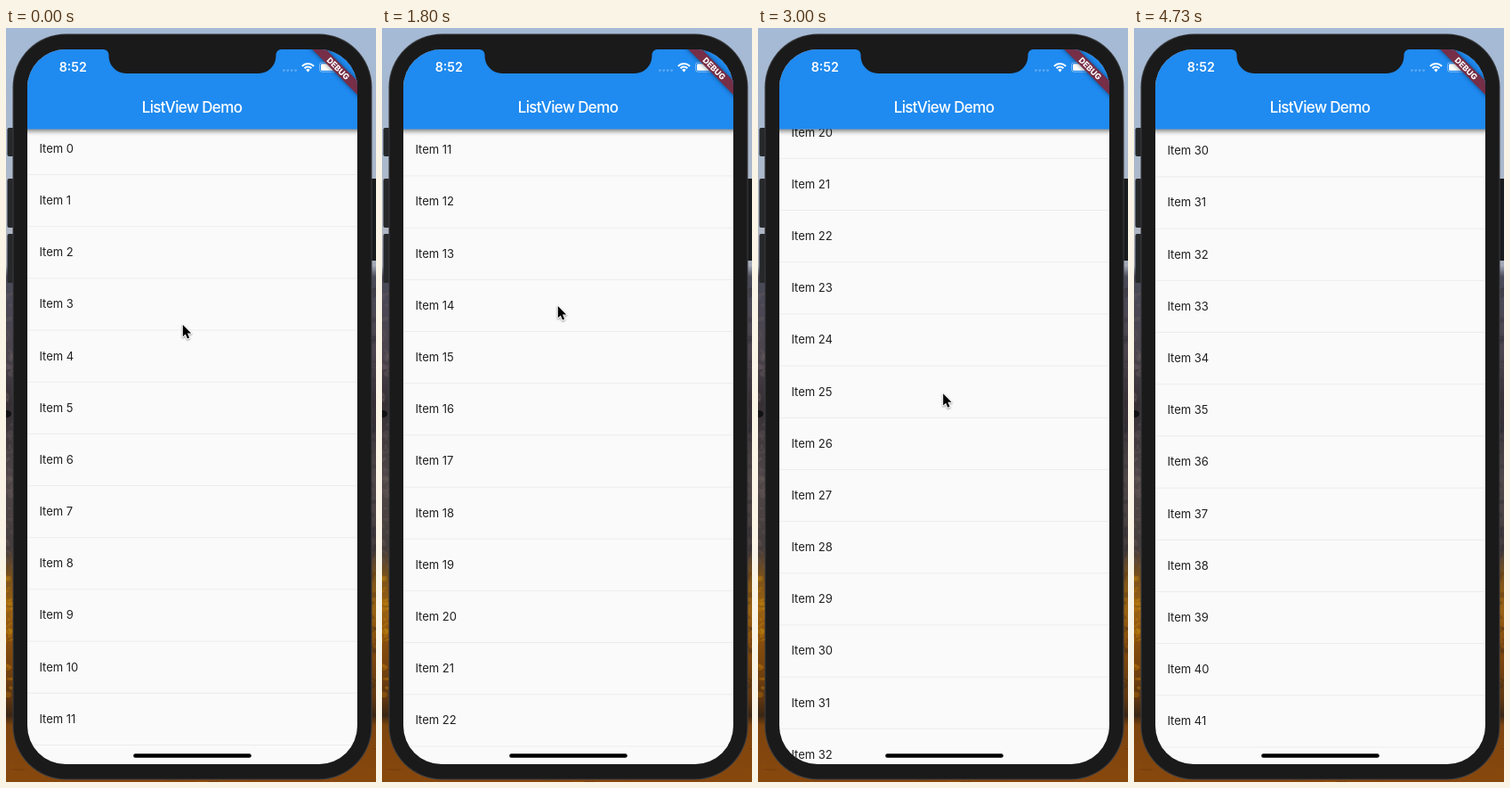
Animation, 416 px wide and 846 px high, one loop 4790 ms. Source, as an HTML page with a canvas:

```html
<!DOCTYPE html>
<html lang="en">
<head>
<meta charset="utf-8">
<title>ListView Demo</title>
<style>
  html, body { margin: 0; width: 100%; height: 100%; overflow: hidden; }
  canvas { display: block; width: 416px; height: 846px; }
</style>
</head>
<body>
<canvas id="stage" width="416" height="846"></canvas>
<script>
const W = 416, H = 846, LOOP = 4790, FPS = 15;
const PITCH = 58.18, FIRST_BASELINE = 139.8, FIRST_DIVIDER = 164;
const SCREEN = { x: 24, y: 24, w: 371, h: 802, r: 43 };
const BAR_BOTTOM = 113.5, BLUE = '#1f8af0';
const FONT = 'Inter, "Liberation Sans", sans-serif';

const scrollKeys = [
  [0, 0], [8, 30], [14, 105], [18, 265.4], [22, 470], [27, 638.5],
  [30, 710], [33, 870], [39, 1082.4], [43, 1165], [48, 1201],
  [52, 1232], [55, 1349.7], [58, 1525], [63, 1693.7], [71, 1742.9]
];
const pointerKeys = [
  [0, 198, 332], [8, 200, 302], [14, 206, 232], [18, 216, 134],
  [22, 207, 220], [27, 197, 311], [29, 200, 290], [32, 214, 150],
  [39, 205, 410], [51, 214, 407], [55, 257, 274.5], [58, 290, 180],
  [62, 440, 120]
];

// Monotone cubic interpolation of one column of a key list
function curve(keys, column) {
  const n = keys.length;
  const slope = i => (keys[i + 1][column] - keys[i][column]) / (keys[i + 1][0] - keys[i][0]);
  const tangent = i => {
    if (i === 0 || i === n - 1) return 0;
    const a = slope(i - 1), b = slope(i);
    return a * b <= 0 ? 0 : 2 * a * b / (a + b);
  };
  return t => {
    if (t >= keys[n - 1][0]) return keys[n - 1][column];
    let i = 0;
    while (t >= keys[i + 1][0]) i++;
    const span = keys[i + 1][0] - keys[i][0], u = (t - keys[i][0]) / span;
    const v = 1 - u;
    return keys[i][column] * v * v * (1 + 2 * u) + keys[i + 1][column] * u * u * (3 - 2 * u)
      + span * u * v * (v * tangent(i) - u * tangent(i + 1));
  };
}
const scrollAt = curve(scrollKeys, 1);
const pointerX = curve(pointerKeys, 1), pointerY = curve(pointerKeys, 2);

const g = document.getElementById('stage').getContext('2d');

function layer(paint) {
  const canvas = document.createElement('canvas');
  canvas.width = W;
  canvas.height = H;
  paint(canvas.getContext('2d'));
  return canvas;
}

function roundRect(c, x, y, w, h, r, fill) {
  c.beginPath();
  c.roundRect(x, y, w, h, r);
  c.fillStyle = fill;
  c.fill();
}

function text(c, string, x, y, font, fill, align = 'left', spacing = 0) {
  c.font = `${font} ${FONT}`;
  c.fillStyle = fill;
  c.textAlign = align;
  c.letterSpacing = `${spacing}px`;
  c.fillText(string, x, y);
}

function seeded(seed) {
  return () => (seed = seed * 16807 % 2147483647) / 2147483647;
}

function paintWallpaper(c) {
  const tones = c.createLinearGradient(0, 0, 0, H);
  [[0, '#a5bad6'], [0.14, '#a9b9cf'], [0.26, '#b0b8c6'], [0.315, '#a3a9b6'],
   [0.33, '#4a4a58'], [0.43, '#4b444d'], [0.5, '#352f34'], [0.6, '#504749'],
   [0.69, '#453c3c'], [0.73, '#7d5218'], [0.77, '#9a6212'], [0.83, '#80480c'],
   [0.89, '#5e3610'], [0.912, '#3a2615'], [0.925, '#7e440e'], [1, '#87480d']
  ].forEach(([at, tone]) => tones.addColorStop(at, tone));
  c.fillStyle = tones;
  c.fillRect(0, 0, W, H);

  const random = seeded(41);
  const speckle = (count, top, bottom, colors) => {
    for (let i = 0; i < count; i++) {
      c.fillStyle = colors[i % colors.length];
      const x = (i % 2 ? 400 : 0) + random() * 16, y = top + random() * (bottom - top);
      c.beginPath();
      c.ellipse(x, y, 1 + random() * 3, 1 + random() * 4, random() * 3, 0, 7);
      c.fill();
    }
  };
  speckle(150, 290, 605, ['#6b5f6344', '#2a273055', '#7d706b33', '#332c3355']);
  speckle(90, 612, 750, ['#c8800a55', '#5a361266', '#d0940f55', '#3c281655']);
  for (let i = 0; i < 60; i++) {
    c.fillStyle = i % 2 ? '#a8600d44' : '#4c290c55';
    c.fillRect(random() * W, 778 + random() * 68, 3 + random() * 12, 1);
  }
}

function paintPhone(c) {
  c.fillStyle = '#111';
  c.beginPath();
  c.ellipse(1, 433, 5, 4, 0, 0, 7);
  c.fill();
  [[112, 32], [169, 55], [231, 55]].forEach(([y, h]) => roundRect(c, 1.5, y, 10, h, 2, '#27282a'));
  roundRect(c, 408, 169, 10, 92, 2, '#191a1b');
  roundRect(c, 7.5, 6.5, 404, 837, 60, '#3c3d40');
  roundRect(c, 8.5, 7.5, 402, 835, 59, '#1a1a1b');
}

function paintStatus(c) {
  text(c, '8:52', 75.2, 49.4, '600 14.2px', '#fff', 'center');
  for (let i = 0; i < 4; i++) roundRect(c, 311 + i * 4.4, 46.2, 2.8, 2.8, 1.4, '#ffffff44');

  c.strokeStyle = '#fff';
  c.lineWidth = 2;
  [5.4, 9].forEach(r => {
    c.beginPath();
    c.arc(339.5, 49, r, -Math.PI * 0.76, -Math.PI * 0.24);
    c.stroke();
  });
  c.beginPath();
  c.moveTo(339.5, 49.5);
  c.arc(339.5, 49, 3, -Math.PI * 0.76, -Math.PI * 0.24);
  c.fillStyle = '#fff';
  c.fill();

  c.lineWidth = 0.8;
  c.strokeStyle = '#ffffff88';
  c.beginPath();
  c.roundRect(352.5, 38.8, 21, 10.4, 2.8);
  c.stroke();
  roundRect(c, 354, 40.2, 18, 7.6, 1.6, '#fff');
}

function paintRibbon(c) {
  c.save();
  c.translate(SCREEN.x + SCREEN.w, SCREEN.y);
  c.rotate(Math.PI / 4);
  c.shadowColor = '#0008';
  c.shadowBlur = 5;
  c.fillStyle = '#772e47';
  c.fillRect(-45, 25, 90, 10.8);
  c.shadowColor = 'transparent';
  text(c, 'DEBUG', 0, 33.7, '800 9px', '#fff', 'center');
  c.restore();
}

function paintNotch(c) {
  c.beginPath();
  c.moveTo(108, 23);
  c.lineTo(109, 24);
  c.arcTo(115.5, 24, 115.5, 30, 6);
  c.arcTo(115.5, 51, 136, 51, 19.5);
  c.arcTo(303.5, 51, 303.5, 31, 19.5);
  c.arcTo(303.5, 24, 310, 24, 6);
  c.lineTo(311, 23);
  c.fillStyle = '#1a1a1b';
  c.fill();
}

function paintChrome(c) {
  c.beginPath();
  c.roundRect(SCREEN.x, SCREEN.y, SCREEN.w, SCREEN.h, SCREEN.r);
  c.clip();
  c.save();
  c.shadowColor = '#0007';
  c.shadowBlur = 5;
  c.shadowOffsetY = 2;
  c.fillStyle = BLUE;
  c.fillRect(SCREEN.x - 10, SCREEN.y - 10, SCREEN.w + 20, BAR_BOTTOM - SCREEN.y + 10);
  c.restore();
  text(c, 'ListView Demo', 209, 94.6, '500 17px', '#fff', 'center', -0.65);
  paintStatus(c);
  paintRibbon(c);
  paintNotch(c);
  roundRect(c, 143.2, 814.2, 132.6, 4.6, 2.3, '#000');
}

const backdrop = layer(c => { paintWallpaper(c); paintPhone(c); });
const chrome = layer(paintChrome);

function drawList(offset) {
  g.save();
  g.beginPath();
  g.roundRect(SCREEN.x, SCREEN.y, SCREEN.w, SCREEN.h, SCREEN.r);
  g.clip();
  g.fillStyle = '#fafafa';
  g.fillRect(SCREEN.x, SCREEN.y, SCREEN.w, SCREEN.h);
  const first = Math.max(0, Math.floor(offset / PITCH) - 1);
  for (let i = first; i < first + 16; i++) {
    const y = i * PITCH - offset;
    text(g, `Item ${i}`, 37.4, FIRST_BASELINE + y, '400 13px', '#202020');
    g.fillStyle = '#ececec';
    g.fillRect(SCREEN.x, FIRST_DIVIDER + y, SCREEN.w, 1);
  }
  g.restore();
}

function drawPointer(x, y) {
  if (x > W + 2) return;
  g.save();
  g.translate(x, y);
  g.beginPath();
  [[0.8, 1], [0.8, 14.2], [3.8, 11.4], [6, 16.6], [8.2, 15.6], [6, 10.6], [10.2, 10.5]]
    .forEach(([px, py]) => g.lineTo(px, py));
  g.closePath();
  g.shadowColor = '#0006';
  g.shadowBlur = 2;
  g.shadowOffsetY = 1;
  g.strokeStyle = '#fff';
  g.lineWidth = 2;
  g.lineJoin = 'round';
  g.stroke();
  g.shadowColor = 'transparent';
  g.fillStyle = '#000';
  g.fill();
  g.restore();
}

function draw(ms) {
  const step = Math.floor((ms % LOOP + 3.4) * FPS / 1000);
  g.drawImage(backdrop, 0, 0);
  drawList(scrollAt(step));
  g.drawImage(chrome, 0, 0);
  drawPointer(pointerX(step), pointerY(step));
}

let start;
function tick(now) {
  start ??= now;
  draw(now - start);
  requestAnimationFrame(tick);
}
draw(0);
requestAnimationFrame(tick);
</script>
</body>
</html>
```
